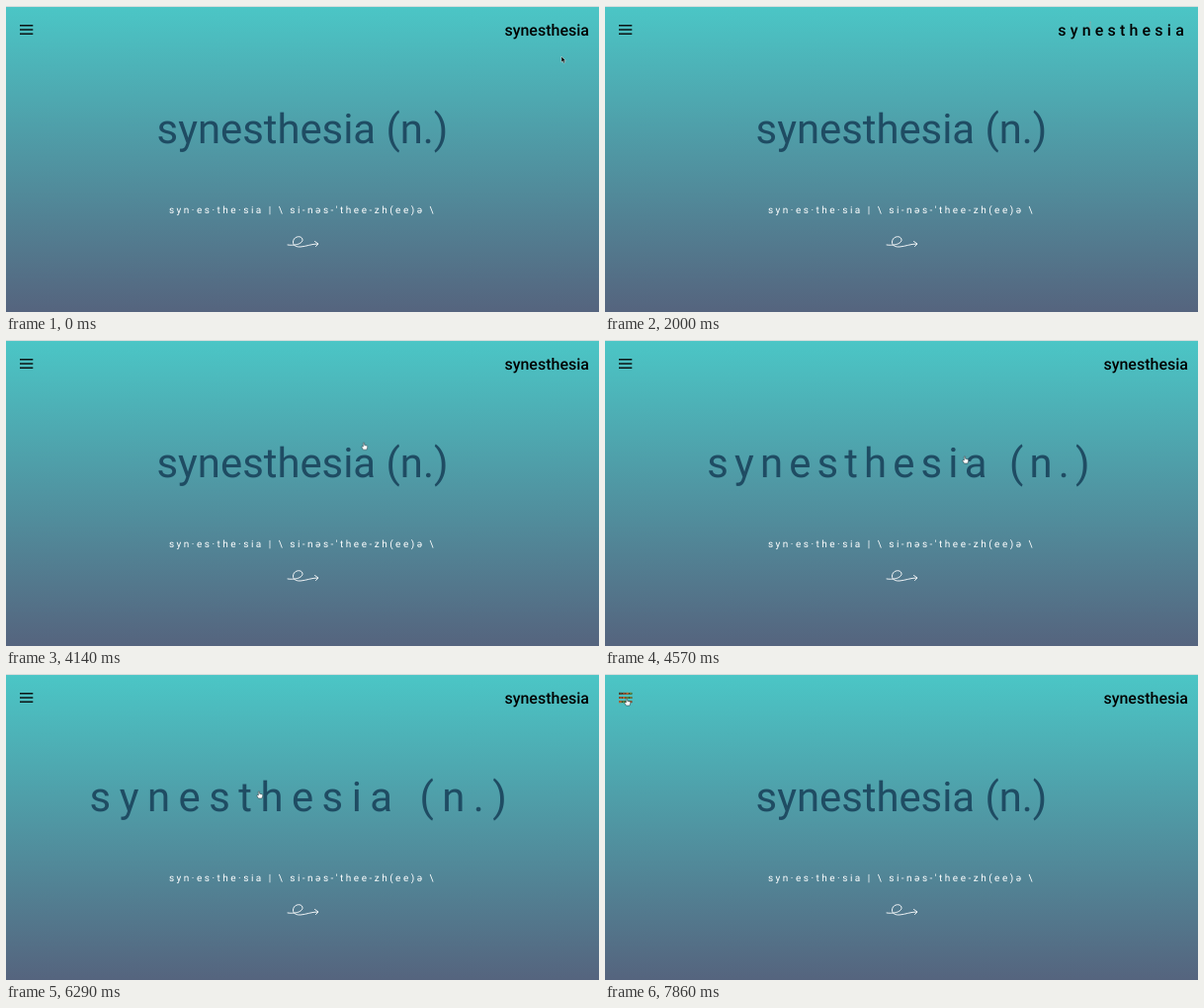
These frames come from a looping animation (600 px wide and 310 px high, 8 s). An HTML page:

```html
<!DOCTYPE html>
<html lang="en">
<head>
<meta charset="utf-8">
<title>synesthesia (n.)</title>
<style>
  html, body { margin: 0; width: 100%; height: 100%; overflow: hidden; }
  svg { display: block; width: 600px; height: 310px; }
  text {
    font-family: Roboto, Inter, sans-serif;
    text-rendering: geometricPrecision;
    white-space: pre;
  }

  /* Every animation is scrubbed through --t, see the script. */
  .anim {
    animation: 8s ease infinite paused;
    animation-delay: calc(var(--t, 0) * -1ms);
  }

  .brand { font-size: 16px; font-weight: 500; text-anchor: end; animation-name: brand; }
  .title { font-size: 41.8px; fill: #1f4c63; text-anchor: middle; animation-name: title; }
  .sound { font-size: 10px; fill: #fff; text-anchor: middle; letter-spacing: 2.5px; }
  .scribble { fill: none; stroke: #fff; stroke-width: .9; stroke-linecap: round; stroke-linejoin: round; }

  .menu { fill: none; stroke: #0b1415; stroke-width: 1.5; }
  .menu-hot { stroke: url(#hot); stroke-width: 2; stroke-dasharray: 3 .6; animation-name: menu-hot; }

  .pointer { animation-name: travel; animation-timing-function: ease-in-out; }
  .arrow { animation-name: arrow; }
  .beam { animation-name: beam; }
  .hand { animation-name: hand; }
  .arrow, .beam, .hand, .menu-hot { animation-timing-function: step-end; }

  @keyframes brand {
    0%, 5.6% { letter-spacing: 0; }
    18.1%, 30.1% { letter-spacing: 4.2px; }
    42.6%, 100% { letter-spacing: 0; }
  }
  @keyframes title {
    0%, 51.75% { letter-spacing: 0; }
    64.25%, 85.6% { letter-spacing: 8.5px; }
    98.1%, 100% { letter-spacing: 0; }
  }
  @keyframes travel {
    0% { transform: translate(562px, 51px); }
    6% { transform: translate(548px, 24px); }
    14% { transform: translate(530px, 22px); }
    25% { transform: translate(491px, 19px); animation-timing-function: linear; }
    30% { transform: translate(456px, 20px); animation-timing-function: ease-out; }
    39.29% { transform: translate(347px, 26px); }
    51.75% { transform: translate(362px, 104px); animation-timing-function: ease-out; }
    57.14% { transform: translate(364px, 118px); }
    78.57% { transform: translate(256px, 119px); animation-timing-function: ease-in; }
    85.6% { transform: translate(86px, 130px); animation-timing-function: ease-out; }
    89.29% { transform: translate(52.5px, 132px); }
    98.21%, 100% { transform: translate(22px, 25px); }
  }
  @keyframes arrow {
    0%, 30.1%, 85.6% { visibility: visible; }
    5.6%, 51.75%, 95.5%, 100% { visibility: hidden; }
  }
  @keyframes beam {
    0%, 30.1%, 100% { visibility: hidden; }
    5.6% { visibility: visible; }
  }
  @keyframes hand {
    0%, 85.6% { visibility: hidden; }
    51.75%, 95.5%, 100% { visibility: visible; }
  }
  @keyframes menu-hot {
    0% { visibility: hidden; }
    95.5%, 100% { visibility: visible; }
  }
</style>
</head>
<body>
<svg viewBox="0 0 600 310">
  <defs>
    <linearGradient id="dusk" x2="0" y2="1">
      <stop stop-color="#4bc6c6"/>
      <stop offset="1" stop-color="#55647e"/>
    </linearGradient>
    <linearGradient id="hot" gradientUnits="userSpaceOnUse" x1="14" y1="19" x2="27" y2="30">
      <stop stop-color="#3b3a2c"/>
      <stop offset=".4" stop-color="#c0612f"/>
      <stop offset=".6" stop-color="#4c8a3c"/>
      <stop offset="1" stop-color="#b8452c"/>
    </linearGradient>
  </defs>

  <rect width="600" height="310" fill="url(#dusk)"/>
  <rect width="600" height="1" fill="#d3dcdb"/>

  <g class="menu">
    <path d="M14 19.8h13.3M14 24h13.3M14 28.3h13.3"/>
    <path class="menu-hot anim" d="M14 19.8h13.3M14 24h13.3M14 28.3h13.3"/>
  </g>

  <text class="brand anim" x="590" y="30">synesthesia</text>
  <text class="title anim" x="300" y="139.3">synesthesia (n.)</text>
  <text class="sound" x="300" y="209.6">syn·es·the·sia | \ si-nəs-'thee-zh(ee)ə \</text>

  <path class="scribble" d="M285 242C291 243 299 241.500 300 237.500C300.500 233 294 232.500 291.500 236C289 240 291 244.500 298 244C304 243.500 309 241 315.500 241M312.500 238.500L316 241L313.500 243.500"/>

  <g class="pointer anim">
    <path class="arrow anim" d="M0 0V6L1.400 4.800L2.400 7L3.500 6.500L2.600 4.400H4.300Z" fill="#000" stroke="#dfe9e9" stroke-width=".5"/>
    <path class="beam anim" d="M-1 -3Q0 -3 0 -2V3Q0 4 -1 4M1 -3Q0 -3 0 -2M0 3Q0 4 1 4" fill="none" stroke="#8fa9a9" stroke-width=".7"/>
    <path class="hand anim" d="M-.7 0Q0 -.6 .6 0V2.300L3.200 2.900Q3.900 3.200 3.700 4.300L3 7H-.6L-2.300 4.300Q-2.300 3.300 -.7 4Z" fill="#fff" stroke="#1c2b33" stroke-width=".5"/>
  </g>
</svg>
<script>
  const LOOP = 8000, RATE = 7 / 1000;

  function draw() {
    const time = performance.now() % LOOP;
    const step = Math.floor((time + 5) * RATE) % (LOOP * RATE);
    document.documentElement.style.setProperty('--t', (step / RATE + .01).toFixed(2));
    requestAnimationFrame(draw);
  }
  draw();
</script>
</body>
</html>
```
